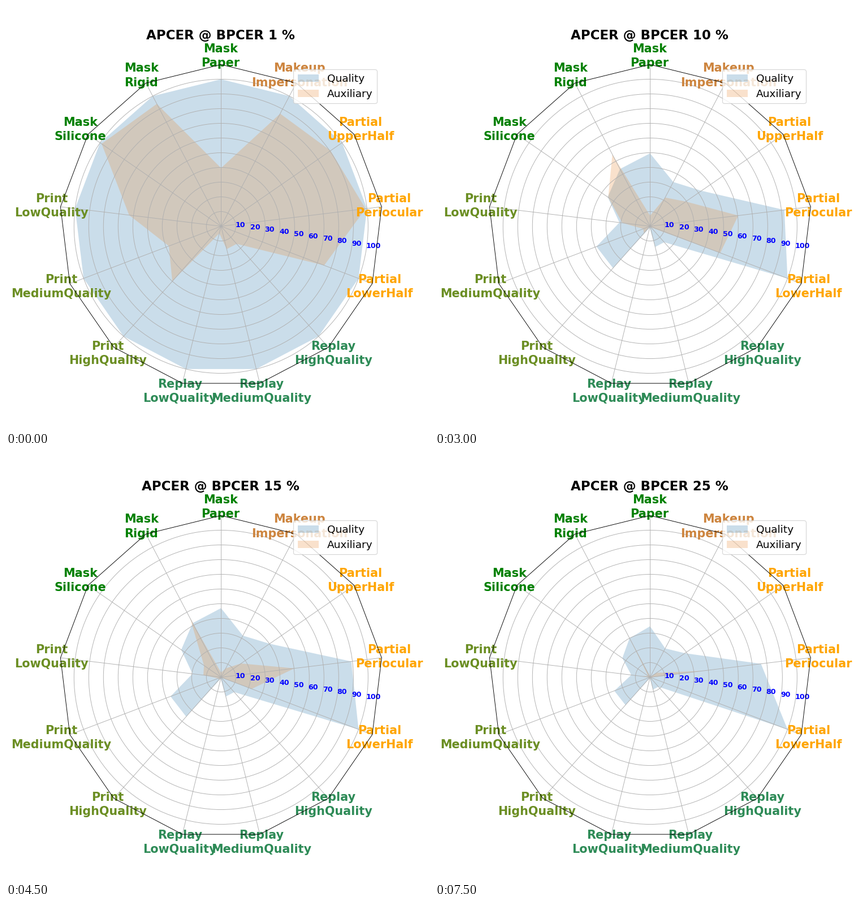
A matplotlib script that plays this animation: 748x748 px, repeating every 8 s.

```python
import matplotlib.pyplot as plt
import numpy as np
from matplotlib.animation import FuncAnimation
from matplotlib.patches import Circle, Polygon

SIZE, DPI = 748, 88
PX = 72 / DPI              # points per pixel
PT = 748 / 648             # pixels per chart point (chart is 9 inches wide)
CX, CY, UNIT = 380.3, 389.5, 2.6
GRID = "#b0b0b0"

# label, colour, quality score at 10 %, and the auxiliary decay curve:
# score at 1 %, decay length in percent, curve shape
ATTACKS = [
    ("Mask\nPaper", "green", 49.6, 39.6, 5, 0.9),
    ("Mask\nRigid", "green", 44, 94, 21.6, 0.72),
    ("Mask\nSilicone", "green", 35, 98.7, 8.7, 1.4),
    ("Print\nLowQuality", "olivedrab", 21, 63, 7, 0.72),
    ("Print\nMediumQuality", "olivedrab", 39, 38, 3.7, 0.8),
    ("Print\nHighQuality", "olivedrab", 38, 50, 4, 0.9),
    ("Replay\nLowQuality", "seagreen", 1, 5, 2.5, 1),
    ("Replay\nMediumQuality", "seagreen", 14.5, 16, 3.4, 1),
    ("Replay\nHighQuality", "seagreen", 14.5, 16, 3.4, 1),
    ("Partial\nLowerHalf", "orange", 118, 75, 13, 2.6),
    ("Partial\nPeriocular", "orange", 92, 99, 24, 0.72),
    ("Partial\nUpperHalf", "orange", 42.5, 90.5, 8, 0.95),
    ("Makeup\nImpersonation", "peru", 34, 86.5, 7.2, 1.4),
]
LABELS, COLORS, *CURVES = zip(*ATTACKS)
QUALITY, START, LENGTH, SHAPE = map(np.array, CURVES)

N = len(ATTACKS)
ANGLES = np.pi / 2 + 2 * np.pi * np.arange(N) / N


def quality(percent):
    """Full up to 5 %, then the weaker classes fall faster."""
    if percent < 10:
        return np.full(N, 100)
    ease = ((percent - 10) / 15) ** 1.6
    loss = 0.45 - 0.3 * QUALITY / 100
    return np.minimum(QUALITY * (1 - loss * ease), 100)


def auxiliary(percent):
    return START * np.exp(-((percent - 1) / LENGTH) ** SHAPE)


def polar(r, angle, pad=0):
    """Chart radius and angle to stage pixels, moved outward by pad pixels."""
    d = np.asarray(r) * UNIT + pad
    return np.column_stack([CX + d * np.cos(angle), CY - d * np.sin(angle)])


def font(points):
    return points * PT * PX


plt.rcParams["font.family"] = "DejaVu Sans"
fig = plt.figure(figsize=(SIZE / DPI, SIZE / DPI), dpi=DPI, facecolor="white")
ax = fig.add_axes([0, 0, 1, 1])
ax.set(xlim=(0, SIZE), ylim=(SIZE, 0))
ax.axis("off")

thin = font(0.8)
for angle in ANGLES:
    x, y = polar([0, 110], angle).T
    ax.plot(x, y, color=GRID, lw=thin, zorder=1.5)
for r in range(10, 101, 10):
    ax.add_patch(Circle((CX, CY), r * UNIT, fill=False, ec=GRID, lw=thin, zorder=1.5))
    x, y = polar([r], np.radians(-9.1))[0]
    ax.text(x, y, str(r), color="blue", weight="bold", size=font(11),
            ha="left", va="bottom", zorder=1.7)

rim = np.full(N, 110)
for text, color, (x, y) in zip(LABELS, COLORS, polar(rim, ANGLES, 15)):
    ax.text(x - 1, y, text, color=color, weight="bold", size=font(18),
            ha="center", va="center", linespacing=1.33, zorder=1.6)
ax.add_patch(Polygon(polar(rim, ANGLES), fill=False, ec="black", lw=thin, zorder=2.5))

areas = []
for name, color in (("Quality", "#2f7aac"), ("Auxiliary", "#e98a35")):
    area = Polygon(polar(rim, ANGLES), fc=color, ec="none", lw=0,
                   alpha=0.25, zorder=1, label=name)
    areas.append(ax.add_patch(area))

legend = ax.legend(handles=areas, fontsize=font(16), loc="upper left",
                   bbox_to_anchor=(508.4, 112.4), bbox_transform=ax.transData,
                   borderaxespad=0, framealpha=0.8)
legend.get_frame().set_linewidth(font(1))

title = ax.text(CX - 0.5, 59, "", weight="bold", size=font(19.8),
                ha="center", va="baseline", zorder=3)


def draw(i):
    percent = max(1, i // 3 * 5)
    title.set_text(f"APCER @ BPCER {percent} %")
    for area, score in zip(areas, (quality, auxiliary)):
        area.set_xy(polar(score(percent), ANGLES))
    return [title, *areas]


anim = FuncAnimation(fig, draw, frames=16, interval=500, repeat=True,
                     repeat_delay=0)
plt.show()
```
